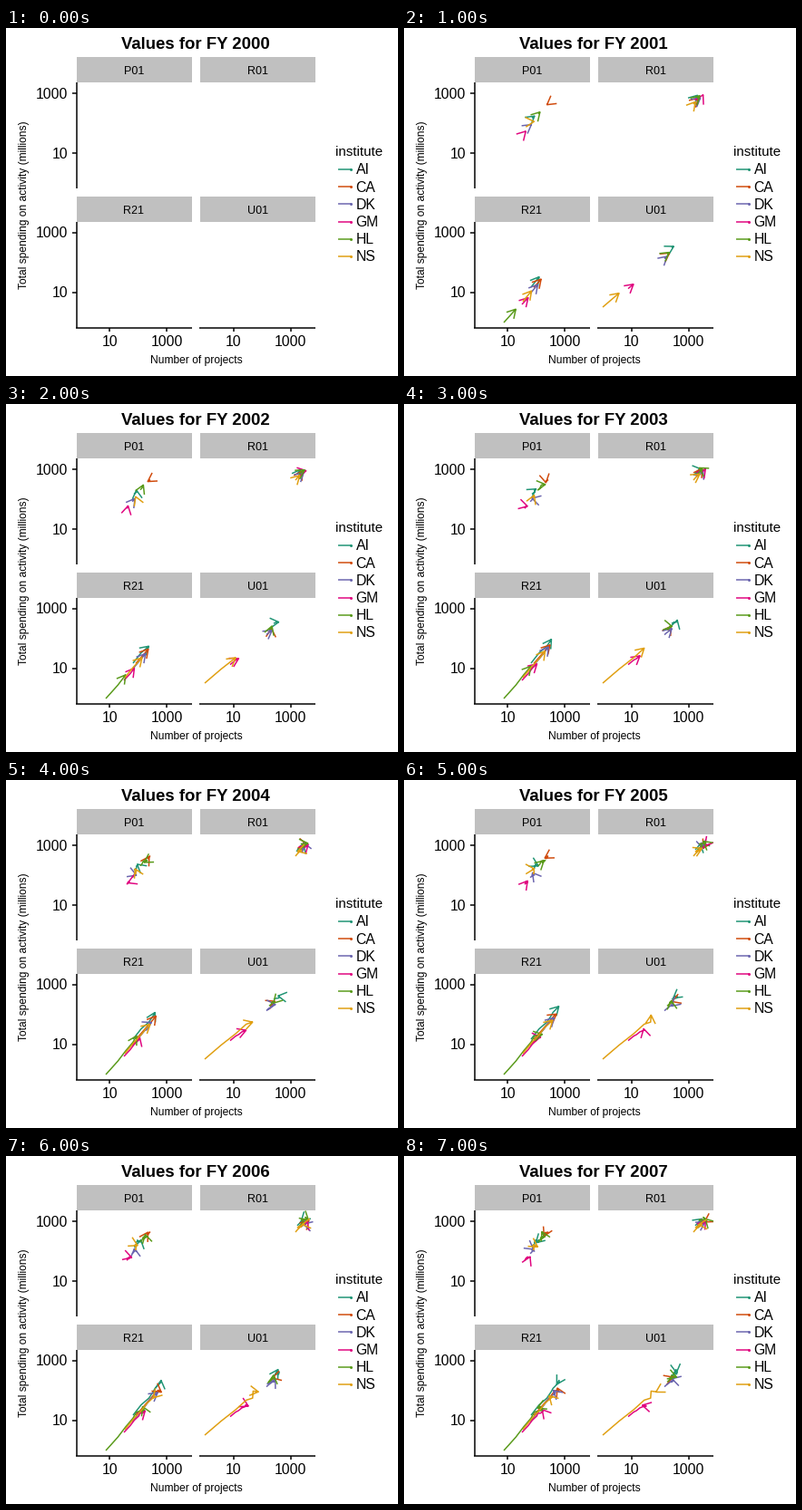
Recreate the animation shown at these times as a matplotlib script. Size 432 px wide and 384 px high, loop 8 s.

```python
import numpy as np
import matplotlib.pyplot as plt
from matplotlib.animation import FuncAnimation
from matplotlib.patches import Rectangle

W, H, DPI = 432, 384, 72          # at 72 dpi one point is one pixel
FIRST_YEAR, N_YEARS = 2000, 8
HEAD_LEN, HEAD_ANGLE = 10.8, np.radians(30)
PANEL_W, PANEL_H, STRIP_H = 127, 117, 28
LEFT, RIGHT, TOP, BOTTOM = 77.5, 214, 60.3, 214
AXIS_Y = 330.5
LINE_W = 1.5

COLORS = {"AI": "#1f9474", "CA": "#d04a0b", "DK": "#6a64ae",
          "GM": "#e0047f", "HL": "#599a1a", "NS": "#e09f11"}

# Offset of each institute below the panel's trend line
DROP = dict(AI=-3, CA=1, DK=3, GM=4, HL=0, NS=2)

# Panel: left, top, trend line (x, y, slope), first and last x per institute
PANELS = {
    "P01": (LEFT, TOP, (155, 87, 1.1),
            dict(AI=(141, 148), CA=(159, 155), DK=(139, 143),
                 GM=(133, 137), HL=(148, 155), NS=(142, 145))),
    "R01": (RIGHT, TOP, (329, 71, 1.1),
            dict(AI=(321, 328), CA=(322, 330), DK=(325, 330),
                 GM=(329, 332), HL=(323, 331), NS=(319, 327))),
    "R21": (LEFT, BOTTOM, (110, 325, 1.2),
            dict(AI=(140, 169), CA=(143, 168), DK=(139, 165),
                 GM=(130, 150), HL=(110, 149), NS=(131, 162))),
    "U01": (RIGHT, BOTTOM, (219, 306, 0.8),
            dict(AI=(295, 301), CA=(291, 295), DK=(287, 297),
                 GM=(247, 264), HL=(290, 296), NS=(219, 279))),
}

rng = np.random.default_rng(4)
plt.rcParams["font.family"] = "Liberation Sans"
fig = plt.figure(figsize=(W / DPI, H / DPI), dpi=DPI, facecolor="white")
ax = fig.add_axes([0, 0, 1, 1])
ax.set(xlim=(0, W), ylim=(H, 0))
ax.axis("off")


def label(x, y, text, size, ha="center", **kw):
    return ax.text(x, y, text, fontsize=size, ha=ha, va="baseline", **kw)


def stroke(xs, ys, color="black", **kw):
    return ax.plot(xs, ys, color=color, lw=LINE_W, solid_capstyle="butt", **kw)[0]


def yearly(trend, span, drop):
    """Slow down along the trend line while wandering more each year."""
    t = np.arange(N_YEARS)
    x0, y0, slope = trend
    ease = 1 - (1 - t / t[-1]) ** 2.5
    x = span[0] + (span[1] - span[0]) * ease
    y = y0 - slope * (x - x0) + drop
    wander = rng.normal(size=(N_YEARS, 2)) * np.minimum(0.4 * t, 1.8)[:, None]
    return np.column_stack([x, y]) + wander


def with_head(path):
    """Append an open arrow head to the end of a path."""
    tip = path[-1]
    dx, dy = path[-2] - tip
    back = np.arctan2(dy, dx)
    arms = [tip + HEAD_LEN * np.array([np.cos(a), np.sin(a)])
            for a in (back - HEAD_ANGLE, back + HEAD_ANGLE)]
    return np.vstack([path, [np.nan, np.nan], arms[0], tip, arms[1]])


def draw_axes():
    for top in (TOP, BOTTOM):
        stroke([LEFT, LEFT], [top, top + PANEL_H])
        for text, dy in (("1000", 12), ("10", 78)):
            stroke([73, LEFT], [top + dy] * 2)
            label(68.5, top + dy + 5.3, text, 15.7, ha="right")
    for left in (LEFT, RIGHT):
        stroke([left - 0.6, left + PANEL_W], [AXIS_Y, AXIS_Y])
        for text, dx in (("10", 36.7), ("1000", 99.5)):
            stroke([left + dx] * 2, [AXIS_Y, AXIS_Y + 4.7])
            label(left + dx, 351, text, 15.7)
    label(209.5, 370, "Number of projects", 12)
    label(23, 195.5, "Total spending on activity (millions)", 12,
          rotation=90, rotation_mode="anchor")


def draw_legend():
    label(363.5, 141, "institute", 15, ha="left")
    for i, (name, color) in enumerate(COLORS.items()):
        y = 156 + 19.2 * i
        stroke([366, 381], [y, y], color)
        ax.plot([380], [y], "o", color=color, ms=3, mew=0)
        label(385.5, y + 5.4, name, 15.8, ha="left")


def draw_panel(name, left, top, trend, spans):
    """Draw the strip and return (line, points) for each institute."""
    ax.add_patch(Rectangle((left, top - STRIP_H), PANEL_W, STRIP_H,
                           fc="#c0c0c0", ec="none"))
    label(left + PANEL_W / 2, top - 9, name, 12.5)
    window = Rectangle((left, top), PANEL_W, PANEL_H, transform=ax.transData)
    tracks = []
    for key, span in spans.items():
        line = stroke([], [], COLORS[key], solid_joinstyle="round")
        line.set_clip_path(window)
        tracks.append((line, yearly(trend, span, DROP[key])))
    return tracks


title = label(209, 23, "", 18.6, weight="bold")
tracks = [t for name, spec in PANELS.items() for t in draw_panel(name, *spec)]
draw_axes()
draw_legend()


def update(year):
    title.set_text(f"Values for FY {FIRST_YEAR + year}")
    for line, points in tracks:
        if year == 0:
            line.set_data([], [])
        else:
            line.set_data(*with_head(points[:year + 1]).T)
    return [title] + [line for line, _ in tracks]


anim = FuncAnimation(fig, update, frames=N_YEARS, interval=1000,
                     repeat=True, repeat_delay=0, blit=False)
plt.show()
```
